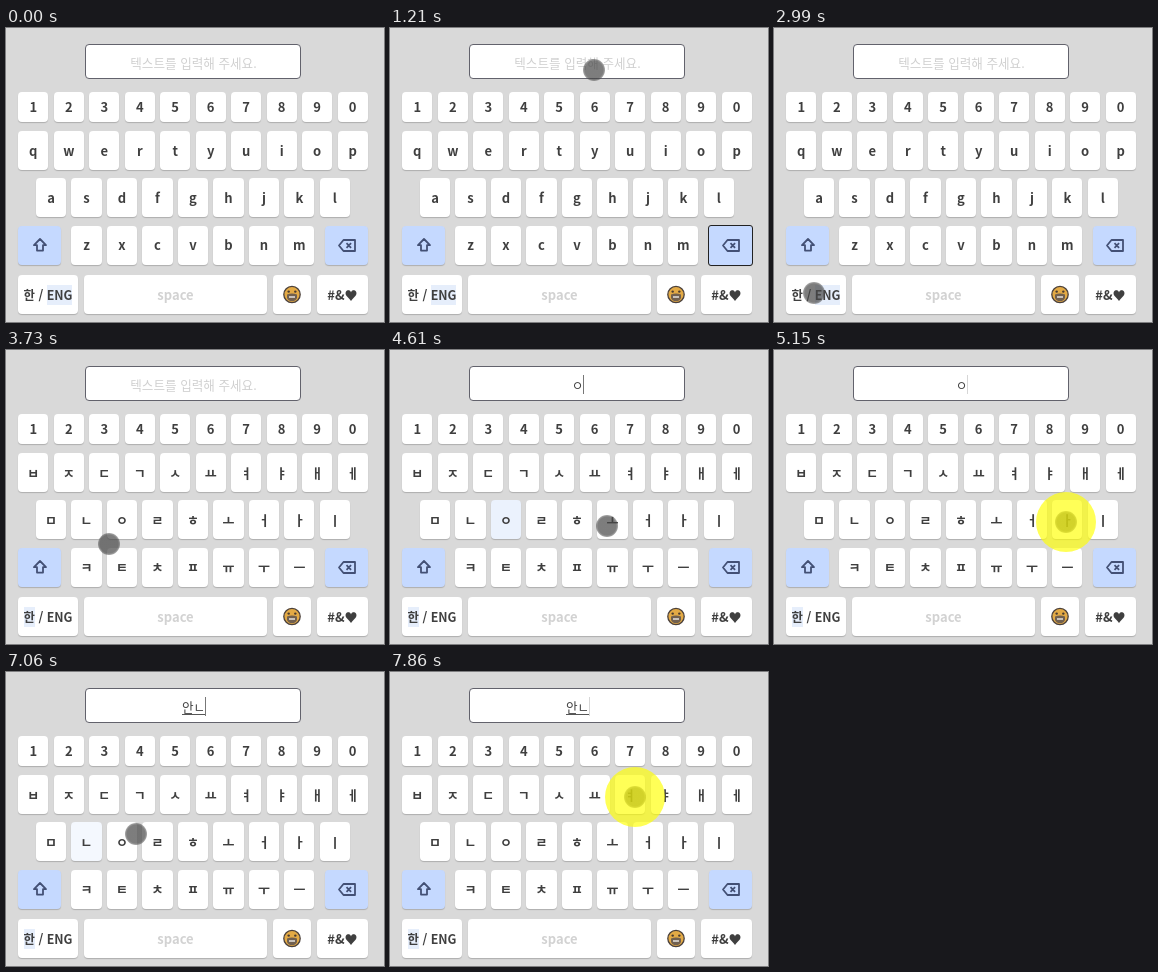
An HTML page that plays this animation: 378x294 px, repeating every 7990 ms.

```html
<!DOCTYPE html>
<html lang="ko">
<head>
<meta charset="utf-8">
<title>Keyboard</title>
<style>
html, body { margin: 0; width: 100%; height: 100%; overflow: hidden; background: #d9d9d9; }
#stage { position: absolute; left: 0; top: 0; width: 378px; height: 294px; overflow: hidden;
  font: 700 13px/20px "Noto Sans CJK KR", "Noto Sans CJK", "Noto Sans", sans-serif; color: #3f3f3f; }
#stage div { position: absolute; box-sizing: border-box; }
.key { display: flex; align-items: center; justify-content: center; white-space: pre;
  background: #fff; border-radius: 4px; box-shadow: 0 1px 1px rgba(0,0,0,.2); }
.key.blue { background: #c5d9ff; }
.key.focus { outline: 1px solid #222; outline-offset: -.5px; border-radius: 2px; }
#lang { font-size: 12.4px; }
#space { color: #d2d2d2; }
.on { background: #e6eefb; }
#field { left: 79px; top: 16px; width: 216px; height: 35px; border: 1px solid #62626c;
  border-radius: 4px; background: #fff; }
#text { left: 80px; top: 25px; width: 215px; height: 20px; text-align: center;
  font-weight: 400; font-size: 12.6px; }
#text.empty { color: #d0d0d0; }
#text.marked span { border-bottom: 1px solid #555; display: inline-block; height: 17px; }
#caret { top: 25px; width: 1px; height: 19px; background: #777; }
#pointer { width: 22px; height: 22px; margin: -11px; border-radius: 50%;
  background: radial-gradient(circle, rgba(70,70,70,.7) 58%, rgba(80,80,80,.48) 72%); }
#ring { width: 60px; height: 60px; margin: -30px; border-radius: 50%; background: rgba(255,255,0,.66); }
svg { display: block; overflow: visible; }
</style>
</head>
<body>
<div id="stage">
  <div id="field"></div>
  <div id="text"><span></span></div>
  <div id="caret"></div>
</div>
<script>
const LOOP = 7990, PITCH = 35.48;
const stage = document.getElementById('stage');
const text = document.getElementById('text');
const caret = document.getElementById('caret');

function add(cls, id) {
  const el = document.createElement('div');
  el.className = cls;
  el.id = id;
  return stage.appendChild(el);
}
function place(el, x, y) {
  el.style.left = x + 'px';
  el.style.top = y + 'px';
}
function key(id, x, y, w, h, html, cls = '') {
  const el = add('key ' + cls, id);
  place(el, x, y);
  el.style.width = w + 'px';
  el.style.height = h + 'px';
  el.innerHTML = html;
  return el;
}

const rows = [
  ['1234567890', '1234567890'],
  ['qwertyuiop', 'ㅂㅈㄷㄱㅅㅛㅕㅑㅐㅔ'],
  ['asdfghjkl', 'ㅁㄴㅇㄹㅎㅗㅓㅏㅣ'],
  ['zxcvbnm', 'ㅋㅌㅊㅍㅠㅜㅡ']
];
const letters = [];
rows.forEach(([latin, jamo], r) => {
  const left = 12.2 + (10 - latin.length) * PITCH / 2;
  const top = r ? 55.6 + r * 47.4 : 64.4;
  [...latin].forEach((c, i) => {
    const el = key('k' + jamo[i], left + i * PITCH, top, 30.2, r ? 39 : 30, c);
    letters.push({ el, latin: c, jamo: jamo[i] });
  });
});

const icon = (w, h, d) =>
  `<svg width="${w}" height="${h}" fill="none" stroke="#435075" stroke-width="1.8" stroke-linejoin="round"><path d="${d}"/></svg>`;
key('shift', 12, 197.6, 43, 39, icon(14, 14, 'M7 1 13 7.2H10V12.6H4V7.2H1Z'), 'blue');
const back = key('back', 319.3, 197.6, 43, 39,
  icon(18, 13, 'M5.5 1H17V12H5.5L1 6.5ZM8.5 4.2l4.6 4.6M13.1 4.2 8.5 8.8'), 'blue');
const lang = key('lang', 12, 247, 60, 39, '<span>한</span> / <span>ENG</span>');
const [ko, en] = lang.querySelectorAll('span');
key('space', 78, 247, 183, 39, 'space');
key('emoji', 266.6, 247, 38.6, 39, `<svg width="18" height="18">
  <circle cx="9" cy="8.5" r="8.2" fill="#e3aa45" stroke="#4a403c" stroke-width="1.3"/>
  <path d="M4 8.5Q9 6.5 14 8.5V12Q12.5 15.2 9 15.2T4 12Z" fill="#71604f"/>
  <path d="M6 10H12V12H6Z" fill="#c9c2ba"/>
  <circle cx="5.7" cy="5.6" r="1.2" fill="#4a3b30"/><circle cx="12.3" cy="5.6" r="1.2" fill="#4a3b30"/></svg>`);
key('signs', 310.8, 247, 51.2, 39, '#&amp;♥');

const pointer = add('', 'pointer'), ring = add('', 'ring');

// Each tap: press and release time, place, key that lights up, text afterwards.
const taps = [
  { up: 150, x: 330, y: 300 },
  { down: 1010, up: 1210, rest: 330, x: 204, y: 42 },
  { down: 3190, up: 3390, x: 40, y: 265 },
  { down: 4210, up: 4480, x: 119, y: 172, jamo: 'ㅇ', value: 'ㅇ' },
  { down: 5150, up: 5410, x: 292, y: 172, jamo: 'ㅏ', value: '아' },
  { down: 6030, up: 6370, x: 86, y: 172, jamo: 'ㄴ', value: '안' },
  { down: 6850, up: 6990, x: 86, y: 172, jamo: 'ㄴ', value: '안ㄴ' },
  { down: 7860, up: LOOP, x: 245, y: 125 }
];
const [, focusTap, langTap] = taps;

// The pointer leaves at release, sags a little and rests before the next press.
function pointAt(t) {
  const i = taps.findIndex(p => t < p.up - 55);
  if (i < 1) return taps[i < 0 ? taps.length - 1 : 0];
  const a = taps[i - 1], b = taps[i];
  const start = a.up - 55 + (a.rest || 0), span = b.down - 210 - start;
  const u = Math.min(1, Math.max(0, (t - start) / span));
  const p = 1 - (1 - u) ** (1 + 450 / span);
  const dx = b.x - a.x, dy = b.y - a.y;
  const sag = .1 * p * (1 - p) * Math.sign(dx);
  return { x: a.x + dx * p - dy * sag, y: a.y + dy * p + dx * sag };
}

let korean, shown;
function setLayout(on) {
  if (on === korean) return;
  korean = on;
  for (const k of letters) k.el.textContent = on ? k.jamo : k.latin;
  ko.className = on ? 'on' : '';
  en.className = on ? '' : 'on';
}
function setText(value) {
  if (value === shown) return;
  shown = value;
  text.firstElementChild.textContent = value || '텍스트를 입력해 주세요.';
  text.className = !value ? 'empty' : value.length > 1 ? 'marked' : '';
  caret.style.left = 187 + value.length * 6 + 'px';
}

function draw(t) {
  setLayout(t >= langTap.up);

  const typed = taps.filter(p => p.value && p.up <= t).pop();
  setText(typed ? typed.value : '');
  caret.style.opacity = !typed ? 0 : (t - typed.up) % 1000 < 500 ? 1 : .3;

  for (const k of letters) k.el.style.background = '';
  if (typed) {
    const d = t - typed.up;
    const glow = Math.max(0, Math.min(d / 130, (280 - d) / 150));
    document.getElementById('k' + typed.jamo).style.background =
      `rgb(${255 - 20 * glow},${255 - 13 * glow},${255 - 2 * glow})`;
  }
  back.classList.toggle('focus', t >= focusTap.down + 70 && t < focusTap.up + 130);

  const at = pointAt(t);
  pointer.style.display = t < 120 ? 'none' : '';
  place(pointer, at.x, at.y);
  ring.style.display = taps.some(p => t >= p.down && t < p.up) ? '' : 'none';
  place(ring, at.x, at.y);
}

const begin = performance.now();
function tick() {
  draw((performance.now() - begin) % LOOP);
  requestAnimationFrame(tick);
}
tick();
</script>
</body>
</html>
```
